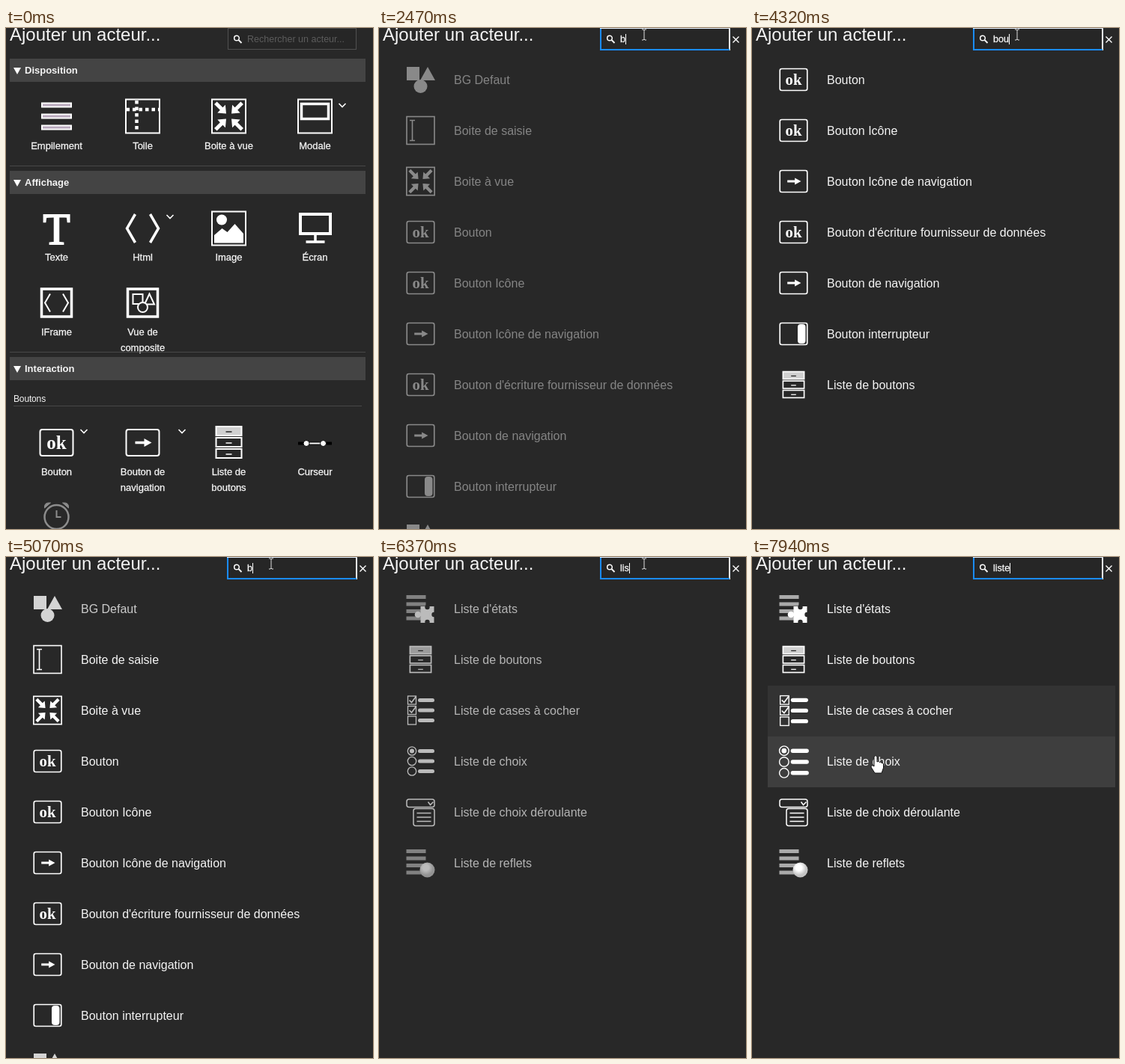
Animation, 490 px wide and 670 px high, one loop 8 s. Source, as an HTML page:

```html
<!DOCTYPE html>
<html lang="fr">
<head>
<meta charset="utf-8">
<title>Ajouter un acteur</title>
<style>
html, body { margin: 0; height: 100%; overflow: hidden; background: #282828; }
svg { display: block; width: 490px; height: 670px; font-family: "Liberation Sans", Arial, sans-serif; }
text { fill: #f4f4f4; stroke: none; white-space: pre; }
.icon { fill: none; stroke: #fff; stroke-width: 2; }
.solid { fill: #fff; stroke: none; }
.label { font-size: 13px; text-anchor: middle; stroke: #f4f4f4; stroke-width: .3; }
.head { font-size: 13px; font-weight: bold; }
.ok { font: bold 25px "Liberation Serif", serif; text-anchor: middle; fill: #fff; }
.field { font-size: 12.5px; }
</style>
</head>
<body>
<svg id="stage" viewBox="0 0 490 670"></svg>
<script>
const LOOP = 8000, FADE = 600, FOCUS = 1400;
const stage = document.getElementById('stage');
const pen = document.createElement('canvas').getContext('2d');
pen.font = '12.5px "Liberation Sans", Arial, sans-serif';

const clamp = v => Math.max(0, Math.min(1, v));
const path = (d, attrs = '') => `<path d="${d}" ${attrs}/>`;
const rect = (x, y, w, h, attrs = '') => `<rect x="${x}" y="${y}" width="${w}" height="${h}" ${attrs}/>`;
const circle = (x, y, r, attrs = '') => `<circle cx="${x}" cy="${y}" r="${r}" ${attrs}/>`;
const text = (x, y, s, attrs = '') => `<text x="${x}" y="${y}" ${attrs}>${s}</text>`;
const at = (x, y, body, scale = 1) =>
  `<g class="icon" transform="translate(${x} ${y}) scale(${scale})">${body}</g>`;
const S = 'class="solid"';

// Icons, centred on the origin
const frame = rect(-22.5, -22.5, 45, 45);
const button = rect(-22, -17.5, 44, 35, 'rx="3"');
const screen = rect(-20, -18.5, 40, 37, 'stroke-width="3.5"');
const brackets = (x, w, h) => path(`M${-x} ${-h}L${-x - w} 0L${-x} ${h}M${x} ${-h}L${x + w} 0L${x} ${h}`);
const icon = {
  stack: [-15, 0, 15].map(y => rect(-19.5, y - 2.5, 39, 5, 'fill="#b9a9bd"')).join(''),
  canvas: frame + path('M-8 -21V21M-22 -9H22', 'stroke-width="4.5" stroke-dasharray="4.5 4"'),
  fit: frame + [45, 135, 225, 315].map(a =>
    path('M-25 -2.5H-14V-7.5L-5 0L-14 7.5V2.5H-25Z', `${S} transform="rotate(${a})"`)).join(''),
  modal: frame + rect(-16.5, -16.5, 36, 20, 'stroke-width="3.5" transform="translate(-1.5 0)"'),
  letter: text(0, 21, 'T', 'style="font:59px \'Liberation Serif\',serif;fill:#fff;stroke:#fff;text-anchor:middle"'),
  html: `<g stroke-width="3.5">${brackets(10, 11, 19)}</g>`,
  image: frame + circle(-9.5, -11.5, 7, S) + path('M-19.5 19.5V9L-9 0L-2 5L8 -6L19.5 7V19.5Z', S),
  display: rect(-19.5, -19, 40, 26, 'stroke-width="4"') + path('M.5 7V18M-12 18H13', 'stroke-width="3.5"'),
  iframe: screen + brackets(8.5, 7, 12),
  composite: screen + rect(-13, -11.5, 13, 13) + path('M9 -12L2.5 2H15.5Z') + circle(0, 6, 6.5, 'fill="#282828"'),
  ok: button + text(0, 8, 'ok', 'class="ok"'),
  nav: button + path('M-10 -1.7H2V-5.5L12 0L2 5.5V1.7H-10Z', S),
  drawers: [-15, 0, 15].map(y => rect(-17, y - 6, 34, 12, y < 0 ? 'fill="#d0d0d0"' : '') +
    path(`M-4 ${y + 1}H4`, `stroke-width="1.5" stroke="${y < 0 ? '#222' : '#fff'}"`)).join(''),
  slider: path('M-22.5 0H22.5', 'stroke="#000" stroke-width="4"') + path('M-11 0H11') +
    circle(-11.5, 0, 4, 'fill="#fff" stroke="#000" stroke-width="1"') +
    circle(11, 0, 4, 'fill="#fff" stroke="#000" stroke-width="1"'),
  clock: `<g stroke="#8c8c8c">${circle(0, 0, 16, 'stroke-width="2.5"')}${path('M0 -9V0H6')}` +
    path('M-16 -12Q-17 -20 -8 -19ZM16 -12Q17 -20 8 -19Z', 'fill="#8c8c8c" stroke-width="1"') + '</g>'
};
const small = body => `<g transform="scale(.83)">${body}</g>`;
const shapes = rect(-18.5, -17, 17, 18, S) + path('M9.5 -17L-.5 1H19.5Z', S) + circle(0, 9, 9, S);
const bars = [-18, -8.5, 1, 10.5].map(y => rect(-19, y, 26, 5, 'fill="#aaa" stroke="none"')).join('');
const bullets = mark => [-13.5, 0, 13.5].map((y, i) =>
  mark(y, i) + path(`M-1 ${y}H16`, 'stroke-width="5" stroke-linecap="round"')).join('');
const checks = bullets((y, i) => rect(-17, y - 5.5, 11, 11, 'stroke-width="1.3"') +
  (i < 2 ? path(`M-15 ${y}l3 3l6 -8`, 'stroke-width="1.6"') : ''));
const radios = bullets((y, i) => circle(-11.5, y, 5.7, 'stroke-width="1.3"') +
  (i ? '' : circle(-11.5, y, 3, S)));
const puzzle = rect(0, -3, 18, 22, S) + circle(-3.5, 8, 4.3, S) +
  circle(9, -2, 3.2, 'fill="#282828" stroke="none"') + circle(9, 18, 3.2, 'fill="#282828" stroke="none"') +
  circle(18, 8, 3.2, 'fill="#282828" stroke="none"');
const combo = `<g stroke-width="1.5">${rect(-18.5, -17, 37, 10.5, 'rx="3"')}${path('M10 -13.5l3 4l4 -4')}` +
  rect(-9.5, -4.5, 28, 23, 'rx="3"') + path('M-5 1.5H14M-5 7H14M-5 12.5H14') + '</g>';

const items = [
  ['BG Defaut', shapes],
  ['Boite de saisie', rect(-18.5, -18.5, 37, 37, 'stroke-width="1.6"') +
    path('M-14.5 -13.5H-7.5M-11 -13.5V13.5M-14.5 13.5H-7.5', 'stroke-width="1.6"')],
  ['Boite à vue', small(icon.fit)],
  ['Bouton', small(icon.ok)],
  ['Bouton Icône', small(icon.ok)],
  ['Bouton Icône de navigation', small(icon.nav)],
  ["Bouton d'écriture fournisseur de données", small(icon.ok)],
  ['Bouton de navigation', small(icon.nav)],
  ['Bouton interrupteur', small(button) + rect(5.5, -13, 10.5, 26, `rx="4" ${S}`)],
  ['Bulle', shapes],
  ["Liste d'états", bars + puzzle],
  ['Liste de boutons', small(icon.drawers)],
  ['Liste de cases à cocher', checks],
  ['Liste de choix', radios],
  ['Liste de choix déroulante', combo],
  ['Liste de reflets', bars + circle(9, 9.5, 10, 'fill="url(#ball)" stroke="none"')]
];

const typing = [
  [-FADE, ''], [2200, 'b'], [2600, 'bo'], [2750, 'bou'], [2880, 'bout'], [2980, 'bouto'], [3100, 'bouton'],
  [3850, 'bouto'], [4120, 'bout'], [4220, 'bou'], [4450, 'bo'], [4590, 'b'], [5130, ''],
  [5960, 'l'], [6060, 'li'], [6200, 'lis'], [6500, 'list'], [6710, 'liste']
];
const matches = (name, query) => query && (' ' + name.toLowerCase()).includes(' ' + query);

// Opacity of something shown for as long as test(query) has held
function fadeIn(t, step, test) {
  while (step > 0 && test(typing[step - 1][1])) step--;
  return clamp((t - typing[step][0]) / FADE);
}

const COLS = [67.5, 182.5, 297.5, 412.5];
const tile = (col, y, name, labelY, ...lines) => at(COLS[col], y, icon[name]) +
  lines.map((s, i) => text(COLS[col], labelY + 21 * i, s, 'class="label"')).join('');
const section = (y, name) => rect(5, y, 475, 31, 'fill="#444"') +
  path(`M10 ${y + 12}h10l-5 9z`, 'fill="#fff"') + text(25, y + 20, name, 'class="head"');
const rule = (x, y, w) => rect(x, y, w, 1, 'fill="#484848"');
const chevron = (x, y) => at(x, y, path('M-4.5 -2L0 2.5L4.5 -2', 'stroke-width="1.6"'));

const palette = section(41, 'Disposition') +
  tile(0, 118, 'stack', 162, 'Empilement') + tile(1, 118, 'canvas', 162, 'Toile') +
  tile(2, 118, 'fit', 162, 'Boite à vue') + tile(3, 118, 'modal', 162, 'Modale') + chevron(449, 103) +
  rule(5, 184, 475) + section(191, 'Affichage') +
  tile(0, 268, 'letter', 311, 'Texte') + tile(1, 268, 'html', 311, 'Html') + chevron(219, 252) +
  tile(2, 268, 'image', 311, 'Image') + tile(3, 268, 'display', 311, 'Écran') +
  tile(0, 367.5, 'iframe', 411, 'IFrame') + tile(1, 367.5, 'composite', 411, 'Vue de', 'composite') +
  rule(5, 433, 475) + section(440, 'Interaction') +
  text(10, 500, 'Boutons', 'font-size="12" letter-spacing="-.15"') + rule(10, 505, 465) +
  tile(0, 554.5, 'ok', 598, 'Bouton') + chevron(104, 539) +
  tile(1, 554.5, 'nav', 598, 'Bouton de', 'navigation') + chevron(235, 539) +
  tile(2, 554, 'drawers', 598, 'Liste de', 'boutons') + tile(3, 555.5, 'slider', 598, 'Curseur') +
  tile(0, 654, 'clock', 700);

// Last pointer move: straight down across the rows
const MOVE = 7250, MOVE_MS = 600, FROM = [353, 10], TO = [165, 266];
const timeAtY = y => MOVE + MOVE_MS * (y - FROM[1]) / (TO[1] - FROM[1]);
function hover(t, row) {
  const enter = timeAtY(36 + 68 * row), leave = row < 3 ? timeAtY(104 + 68 * row) : LOOP;
  if (row > 3 || t < enter) return 0;
  return clamp((Math.min(t, leave) - enter) / 100) * clamp(1 - (t - leave) / 300);
}

function results(t, step) {
  return items.filter(([name]) => matches(name, typing[step][1])).map(([name, body], row) => {
    const y = 69 + 68 * row, h = hover(t, row);
    return rect(21, y - 33, 464, 68, `fill="#fff" opacity="${h * .1}"`) +
      `<g opacity="${fadeIn(t, step, q => matches(name, q))}">` +
      at(55.5, y + h, body, 1 + .1 * h) + text(100, y + 6, name, 'font-size="16"') + '</g>';
  }).join('');
}

function searchBox(t, query) {
  const focus = t >= FOCUS;
  let out = rect(296.5, .5, 171, 28, `fill="#262626" stroke="${t < 1080 ? '#505050' : '#f2f2f2'}"`);
  if (focus) out += path('M296 0V29H468', 'fill="none" stroke="#1a8cff" stroke-width="2"') +
    path('M295 .5H468.5V30', 'fill="none" stroke="#e8f2ff"');
  out += at(309, 14.5, circle(-1, -1, 3.3, 'stroke-width="1.5"') + path('M1.5 1.5L5.5 5.5', 'stroke-width="1.8"'));
  out += query ? text(322, 19, query, 'class="field" style="stroke:#f4f4f4;stroke-width:.3"')
    : text(322, 19, 'Rechercher un acteur...', 'class="field" style="fill:#5c5c5c"');
  if (query) out += at(476.5, 15.5, path('M-4 -4L4 4M4 -4L-4 4', 'stroke-width="1.4"'));
  const since = t - Math.max(FOCUS, ...typing.map(k => k[0]).filter(k => k <= t));
  if (focus && since % 1080 < 540)
    out += rect(Math.round(322 + pen.measureText(query).width), 8, 1, 14, 'fill="#fff"');
  return out;
}

const shape = {
  beam: path('M-3 -7H-1L0 -6L1 -7H3M0 -6V6M-3 7H-1L0 6L1 7H3', 'stroke="#ddd" stroke-width="1"'),
  arrow: path('M0 0V16L4 12.5L6.5 18L9 17L6.5 11.5H11.5Z', 'fill="#fff" stroke="#000" stroke-width="1"'),
  hand: path('M-2 1Q0 -2 2 1V8Q4 6 5 8.500Q7 7 8 9.500Q10 8.500 10.500 11V16L8 23H-1L-6 15Q-6 11 -2 14Z',
    'fill="#fff" stroke="#111" stroke-width="1"')
};
function pointer(t) {
  if (t < 330) return '';
  let x, y, kind = 'arrow';
  if (t < MOVE) {
    const p = 1 - (1 - clamp((t - 330) / 750)) ** 2;
    x = 473 - 119 * p;
    y = 581 - 572 * p;
  } else {
    const p = clamp((t - MOVE) / MOVE_MS);
    x = FROM[0] + (TO[0] - FROM[0]) * p;
    y = FROM[1] + (TO[1] - FROM[1]) * p;
    if (y >= 36) kind = 'hand';
  }
  if (y < 29) kind = 'beam';
  return at(x, y, shape[kind]);
}

const defs = '<defs><radialGradient id="ball" cx=".4" cy=".35"><stop offset=".4" stop-color="#fff"/>' +
  '<stop offset="1" stop-color="#c4c4c4"/></radialGradient></defs>';

function draw(now) {
  const t = now % LOOP;
  const step = typing.filter(k => k[0] <= t).length - 1;
  const query = typing[step][1];
  stage.innerHTML = defs +
    (query ? results(t, step) : `<g opacity="${fadeIn(t, step, q => !q)}">${palette}</g>`) +
    text(5, 17, 'Ajouter un acteur...', 'font-size="24"') + searchBox(t, query) + pointer(t);
  requestAnimationFrame(draw);
}
draw(performance.now());
</script>
</body>
</html>
```
